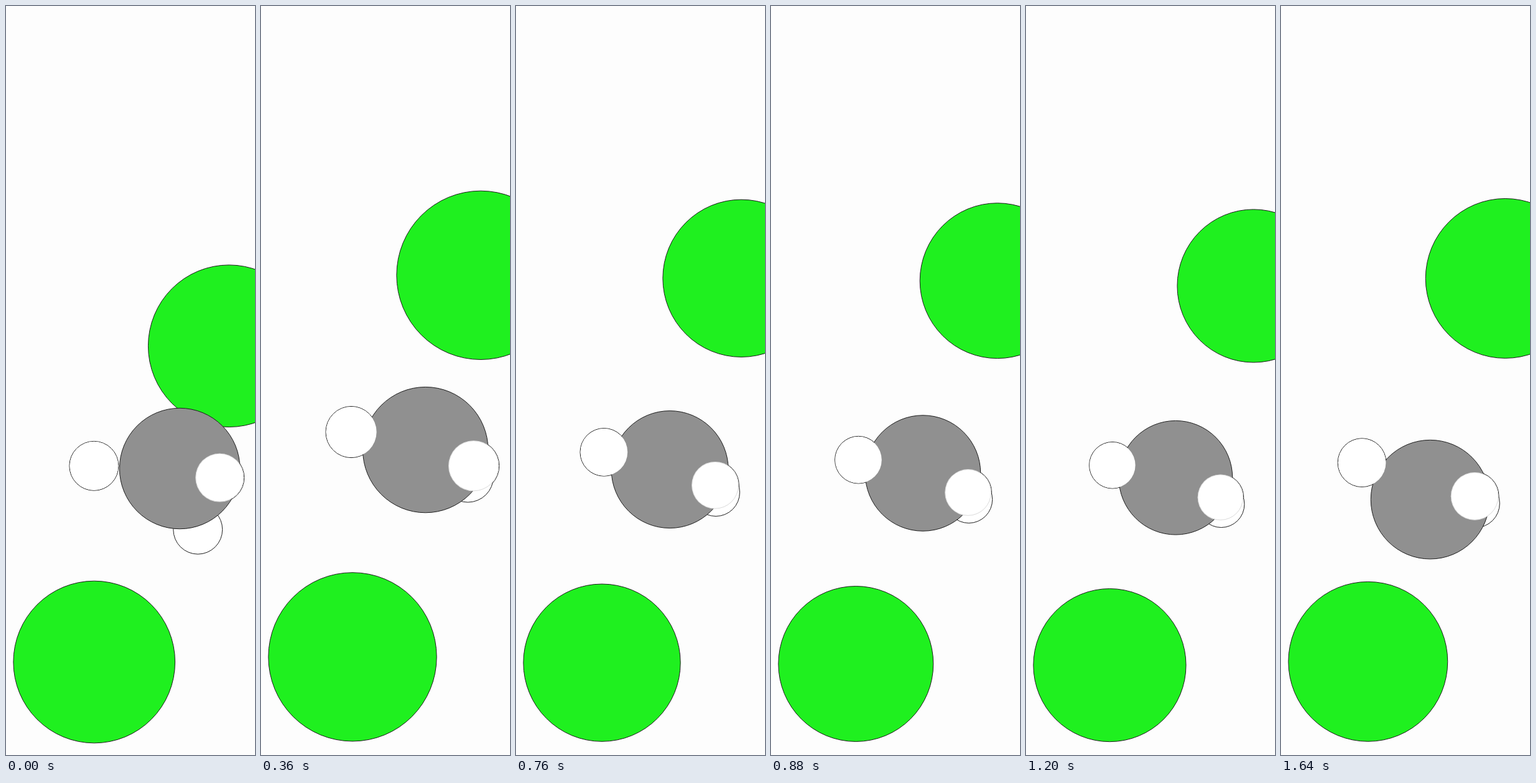
These frames come from a looping animation (400 px wide and 1200 px high, 1.68 s). An HTML page with a canvas:

```html
<!DOCTYPE html>
<html lang="en">
<head>
<meta charset="utf-8">
<title>Methyl transfer</title>
<style>
  html, body { margin: 0; width: 100%; height: 100%; overflow: hidden; background: #fdfdfd; }
  canvas { display: block; width: 400px; height: 1200px; }
</style>
</head>
<body>
<canvas id="stage" width="400" height="1200"></canvas>
<script>
const ctx = document.getElementById('stage').getContext('2d');
const LOOP = 1680, STEP = 40;
const VIEW = 500, FLOOR = 1200, PAD = 1.05; // camera fits the molecule's width, with padding
const CARBON = 0.76 / 1.02, HYDROGEN = 0.31 / 1.02; // radii relative to chlorine
const LINE = '#1c1c1c', GREEN = '#1ff01f', GRAY = '#909090', WHITE = '#ffffff', PAPER = '#fdfdfd';

// Positions in chlorine radii, measured from the lower chlorine, y upwards.
function molecule(s) {
  const bell = width => Math.exp(-((s / width) ** 2));
  const pull = Math.max(0, (s - 1.15) / 0.49) ** 2;
  const kick = bell(0.12);

  // the leaving atom drifts off, slows and turns back
  const upper = [
    1.238 + 0.82 * s - 0.195 * s ** 3 + 0.43 * kick,
    3.9 + 2.193 * s - 1.339 * s ** 2 + 0.205 * s ** 3
  ];
  // the carbon waits, then falls towards the lower atom
  const carbon = [
    0.865 + 0.193 * bell(0.17) - 0.085 * pull,
    2.455 - 0.067 * kick - 0.425 * pull
  ];
  // the hydrogens form a triangle whose middle swings through the carbon
  const swing = 0.18 * Math.exp(-s / 0.8) * Math.cos(2 * Math.PI * (s - 0.08));
  const middle = [
    carbon[0] + 0.12 - 0.1 * (s - 1.1) ** 2 - 0.113 * kick,
    carbon[1] - 0.12 - swing + 0.25 * pull
  ];
  const arm = [-0.947, 0.31];
  const tilt = [0.14 * bell(0.32) - 0.005, 0.045 + 0.275 * bell(0.22)];
  const corner = (a, b) => middle.map((m, i) => m + a * arm[i] + b * tilt[i]);

  return { upper, carbon, side: corner(1, 0), front: corner(-0.5, 1), back: corner(-0.5, -1) };
}

function disc([x, y], r, fill, line) {
  ctx.beginPath();
  ctx.arc(x, y, r, 0, Math.PI * 2);
  if (fill) {
    ctx.fillStyle = fill;
    ctx.fill();
  }
  if (line) {
    ctx.strokeStyle = line;
    ctx.stroke();
  }
}

function draw(s) {
  const { upper, carbon, side, front, back } = molecule(s);
  const r = VIEW / PAD / (upper[0] + 2);
  const margin = (PAD - 1) / 2;
  const left = margin * VIEW / PAD;
  const floor = FLOOR - margin * r * (upper[1] + 2);
  const at = ([x, y]) => [left + (x + 1) * r, floor - (y + 1) * r];
  const small = HYDROGEN * r;

  ctx.fillStyle = PAPER;
  ctx.fillRect(0, 0, 400, 1200);
  disc(at(upper), r, GREEN, LINE);
  disc(at([0, 0]), r, GREEN, LINE);

  // rims go under the carbon: they show only against the background
  for (const h of [side, front, back]) disc(at(h), small, WHITE, LINE);
  disc(at(carbon), CARBON * r, GRAY, LINE);
  for (const h of [side, front]) disc(at(h), small - 0.5, WHITE);
  disc(at(front), small - 1, null, 'rgba(150, 150, 150, 0.35)');
}

function tick() {
  draw(Math.floor(performance.now() % LOOP / STEP) * STEP / 1000);
  requestAnimationFrame(tick);
}
tick();
</script>
</body>
</html>
```
